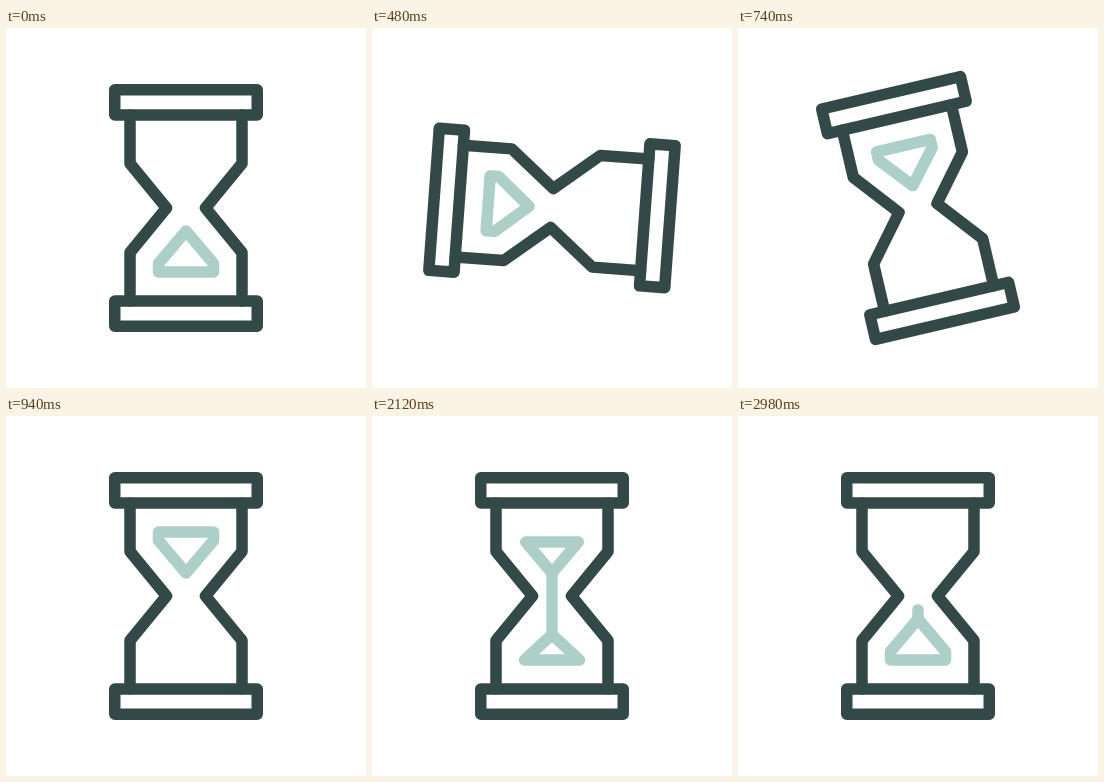
An HTML page with a canvas for the animation above (3000 ms loop, 360 by 360 pixels).

```html
<!DOCTYPE html>
<html lang="en">
<head>
<meta charset="utf-8">
<title>Hourglass</title>
<style>
  html, body { margin: 0; width: 100%; height: 100%; overflow: hidden; background: #fff; }
  canvas { display: block; width: 360px; height: 360px; }
</style>
</head>
<body>
<canvas id="stage"></canvas>
<script>
const SIZE = 360, MID = SIZE / 2, LOOP = 3000, TURN_END = 940;
const FRAME = '#334947', SAND = '#accfc8';
const HALF = 27.5;               // half width of the full sand heap
const TOP = 116, NECK = 157;     // level and tip of the upper sand
const FLOOR = 244, PEAK = 203;   // base and tip of the lower sand

const canvas = document.getElementById('stage');
const ctx = canvas.getContext('2d');
const ratio = window.devicePixelRatio || 1;
canvas.width = canvas.height = SIZE * ratio;

const clamp = v => Math.min(1, Math.max(0, v));
const span = (t, from, to) => clamp((t - from) / (to - from));

// cubic-bezier(.5, 0, .5, 1)
function easeInOut(x) {
  let lo = 0, hi = 1;
  for (let i = 0; i < 24; i++) {
    const u = (lo + hi) / 2;
    if (1.5 * u * (1 - u) + u ** 3 < x) lo = u; else hi = u;
  }
  return lo * lo * (3 - 2 * lo);
}

function stroke(points, color, closed) {
  ctx.beginPath();
  points.forEach(([x, y]) => ctx.lineTo(x, y));
  if (closed) ctx.closePath();
  ctx.strokeStyle = color;
  ctx.stroke();
}

function heap(tip, shoulder, base, half) {
  stroke([
    [MID, tip], [MID + half, shoulder], [MID + half, base],
    [MID - half, base], [MID - half, shoulder]
  ], SAND, true);
}

function drawGlass() {
  for (const y of [61.75, 273]) {
    ctx.strokeStyle = FRAME;
    ctx.strokeRect(108.75, y, 142.5, 25.25);
  }
  for (const side of [-1, 1]) {
    const wall = MID + side * 56, waist = MID + side * 19.5;
    stroke([[wall, 87], [wall, 135.5], [waist, MID], [wall, 224.5], [wall, 273]], FRAME);
  }
}

function drawUpper(t) {
  const p = span(t, 1440, 2820);
  if (p === 1) return;
  const level = TOP + (NECK - TOP) * p * p;
  const shoulder = Math.max(124.5, level);
  heap(NECK, shoulder, level, HALF * (NECK - shoulder) / 32.5);
}

function drawLower(t) {
  const p = span(t, 1400, 2980);
  const tip = FLOOR - (FLOOR - PEAK) * (1 - (1 - p) ** 1.6);
  if (p > 0) {
    const rise = 8.5 * span(t, 2120, 2960);
    heap(tip, FLOOR - rise, FLOOR, HALF * span(t, 1400, 2120));
  }
  return tip;
}

function drawStream(t, end) {
  const head = 182 + (t - 1460) * 0.193;
  const tail = NECK + 46 * span(t, 2820, 3000) ** 2;
  const parts = [[tail, head], [head + 26, head + 33], [head + 58, head + 64]];
  for (const [a, b] of parts) {
    const from = Math.max(tail, a), to = Math.min(end, b);
    if (to > from) stroke([[MID, from], [MID, to]], SAND);
  }
}

function draw(t) {
  ctx.setTransform(ratio, 0, 0, ratio, 0, 0);
  ctx.fillStyle = '#fff';
  ctx.fillRect(0, 0, SIZE, SIZE);
  ctx.lineWidth = 11.5;
  ctx.lineCap = ctx.lineJoin = 'round';
  if (t < TURN_END) {
    ctx.translate(MID, MID);
    ctx.rotate(Math.PI * easeInOut(t / TURN_END));
    ctx.translate(-MID, -MID);
    heap(PEAK, FLOOR - 8.5, FLOOR, HALF);
  } else {
    drawUpper(t);
    drawStream(t, drawLower(t));
  }
  drawGlass();
}

const start = performance.now();
function tick() {
  draw((performance.now() - start) % LOOP);
  requestAnimationFrame(tick);
}
draw(0);
requestAnimationFrame(tick);
</script>
</body>
</html>
```
